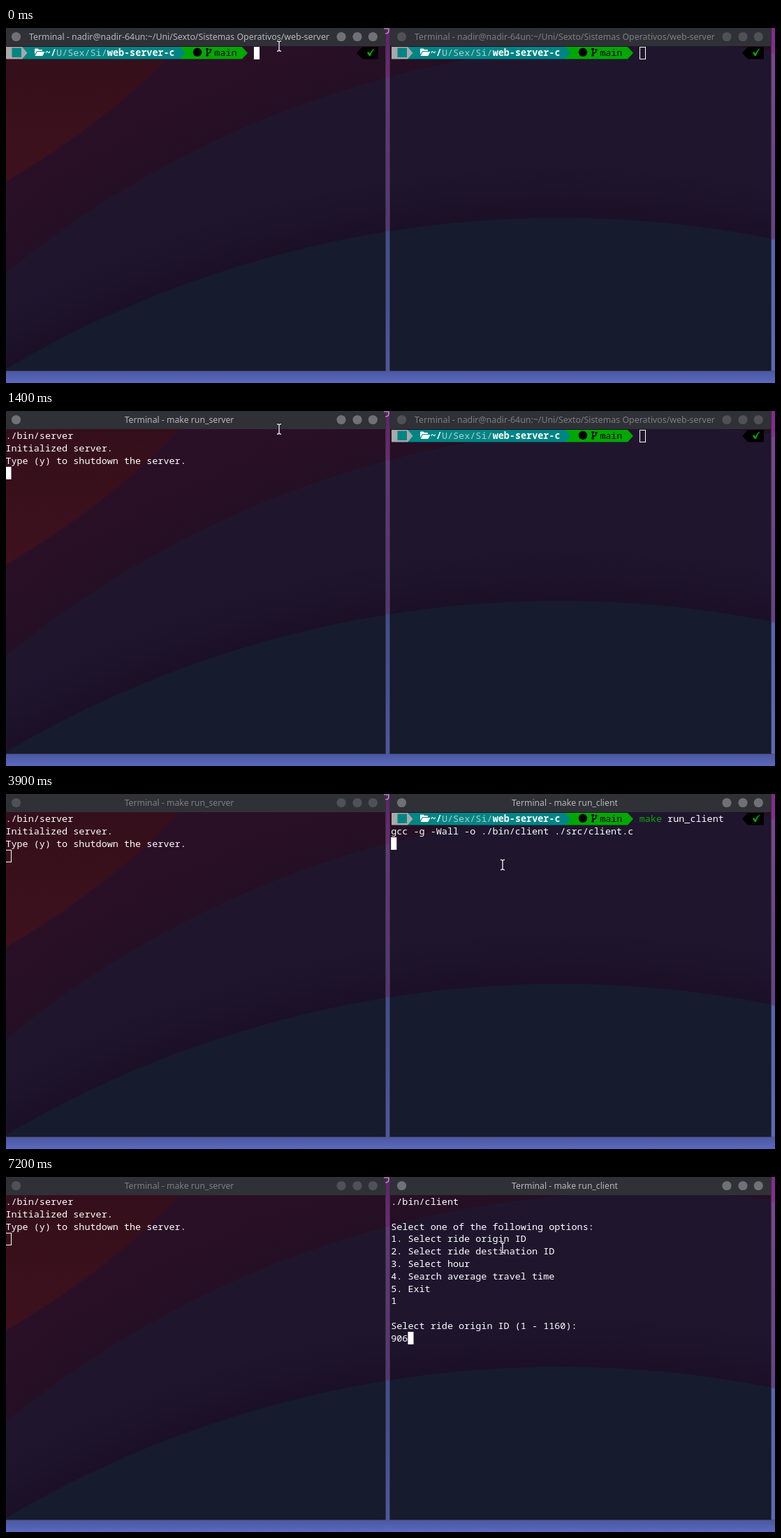
An HTML page for the animation above (8000 ms loop, 1101x509 px).

```html
<!DOCTYPE html>
<html lang="en">
<head>
<meta charset="utf-8">
<title>Two terminals</title>
<style>
html, body { margin: 0; width: 100%; height: 100%; overflow: hidden; background: #5a66bb; }
svg { display: block; width: 1101px; height: 509px; }
text { white-space: pre; }
.mono { font: 500 13.467px "Noto Sans Mono", "DejaVu Sans Mono", monospace; }
.bold { font-weight: 700; }
.bar { font-family: "Noto Sans", "Open Sans", sans-serif; text-anchor: middle; }
</style>
</head>
<body>
<svg viewBox="0 0 1101 509" xmlns="http://www.w3.org/2000/svg">
  <defs>
    <clipPath id="panes"><path d="M0 26H543V491H0ZM550 26H1095V491H550Z"/></clipPath>
    <radialGradient id="wine" gradientUnits="userSpaceOnUse" cx="920" cy="1472" r="1545">
      <stop offset=".9385" stop-color="#240f24"/><stop offset="1" stop-color="#2a1027"/>
    </radialGradient>
    <radialGradient id="plum" gradientUnits="userSpaceOnUse" cx="793" cy="1832" r="1640">
      <stop offset=".9512" stop-color="#1b1026"/><stop offset="1" stop-color="#1f162e"/>
    </radialGradient>
    <linearGradient id="red" x1="0" y1="0" x2="0" y2="1">
      <stop offset="0" stop-color="#340f1b"/><stop offset="1" stop-color="#3d111d"/>
    </linearGradient>
    <linearGradient id="gap" gradientUnits="userSpaceOnUse" x1="0" y1="0" x2="0" y2="509">
      <stop offset="0" stop-color="#5f2468"/><stop offset=".138" stop-color="#6b2a74"/>
      <stop offset=".142" stop-color="#643877"/><stop offset=".57" stop-color="#573575"/>
      <stop offset=".575" stop-color="#414d90"/><stop offset="1" stop-color="#4c58a4"/>
    </linearGradient>
    <linearGradient id="edge" gradientUnits="userSpaceOnUse" x1="0" y1="0" x2="0" y2="509">
      <stop offset="0" stop-color="#85298c"/><stop offset=".07" stop-color="#8a2d93"/>
      <stop offset=".075" stop-color="#7c4494"/><stop offset=".593" stop-color="#66408a"/>
      <stop offset=".598" stop-color="#5563b4"/><stop offset="1" stop-color="#5a68bc"/>
    </linearGradient>
    <linearGradient id="floor" x1="0" y1="0" x2="0" y2="1">
      <stop offset="0" stop-color="#4a56a0"/><stop offset="1" stop-color="#5b69be"/>
    </linearGradient>
  </defs>

  <rect width="1101" height="509" fill="#5a66bb"/>
  <rect x="543" width="8" height="509" fill="url(#gap)"/>
  <rect x="1095" width="6" height="509" fill="url(#edge)"/>
  <rect y="491" width="1101" height="18" fill="url(#floor)"/>

  <path d="M0 0H544V492H0ZM549 0H1096V492H549Z" fill="#33353c"/>
  <g clip-path="url(#panes)">
    <rect y="26" width="1101" height="465" fill="url(#wine)"/>
    <path d="M0 220Q148 133 249 26H0Z" fill="url(#red)"/>
    <circle cx="920" cy="1472" r="1450" fill="url(#plum)"/>
    <circle cx="793" cy="1832" r="1560" fill="#161b2d"/>
  </g>
  <path d="M0 0H544V26H0ZM549 0H1096V26H549Z" fill="#2f3137"/>
  <path d="M541 1H548V4Q548 8 543 8" fill="none" stroke="#d9a5dd" stroke-width="1.2"/>
  <g id="live"></g>
</svg>
<script>
const LOOP = 8000, CELL = 8.08, ROW = 17.8;
const LEFT = -0.6, RIGHT = 551.2;
const live = document.getElementById("live");
const HOME = "Terminal - nadir@nadir-64un:~/Uni/Sexto/Sistemas Operativos/web-server";
const SERVER = ["./bin/server", "Initialized server.", "Type (y) to shutdown the server."];
const MENU = ["./bin/client", "", "Select one of the following options:", "1. Select ride origin ID",
  "2. Select ride destination ID", "3. Select hour", "4. Search average travel time", "5. Exit"];
const ASK = ["1", "", "Select ride origin ID (1 - 1160):"];

const put = (x0, col, row, str, fill = "#fff", cls = "") =>
  `<text class="mono ${cls}" x="${x0 + col * CELL}" y="${Math.round(40 + row * ROW)}" fill="${fill}">${str}</text>`;

const lines = (x0, list) => list.map((s, i) => put(x0, 0, i, s)).join("");

function caret(x0, col, row, solid) {
  const x = x0 + col * CELL, y = Math.floor(27 + row * ROW);
  return solid
    ? `<rect x="${x}" y="${y}" width="${CELL}" height="18" fill="#fff"/>`
    : `<rect x="${Math.round(x) + .5}" y="${y + .5}" width="8" height="17" fill="none" stroke="#fff"/>`;
}

function titleBar(x, title, active) {
  const size = title === HOME ? 12.37 : 12.22;
  const dots = [14.5, 480, 503, 525.3].map(cx =>
    `<circle cx="${x + cx}" cy="12.5" r="6.6" fill="${active ? "#707176" : "#505157"}"/>`).join("");
  return dots + `<text class="bar" x="${x + 248}" y="17" font-size="${size}" fill="${
    active ? "#b6b7b9" : "#7d7e82"}">${title}</text>`;
}

function prompt(x0) {
  const shapes = `<g transform="translate(${Math.round(x0 + .6)} 0)">
    <path d="M249 27H338L346 35.8L338 44.6H249Z" fill="#00a800"/>
    <path d="M22 27H249L256.5 35.8L249 44.6H22Z" fill="#008585"/>
    <path d="M0 27H23L30.5 35.8L23 44.6H0Z" fill="#a9a9a9"/>
    <rect x="8.5" y="28.5" width="13.5" height="13.5" fill="#008585"/>
    <path d="M41 38V30.5Q41 29.5 42 29.5H45.5L47 31H51Q52 31 52 32V33H45Q44 33 43.5 34ZM41.5 40L44.3 34.6Q44.6 34 45.3 34H55.5L52.8 39.3Q52.4 40 51.7 40Z" fill="#fff"/>
    <circle cx="274" cy="34.8" r="6.2"/>
    <path d="M288 31V38M288 36.5Q293 36 293 32.5" fill="none" stroke="#000" stroke-width="1.5"/>
    <path d="M286.3 29h3.4v2.6h-3.4zM286.3 38h3.4v2.6h-3.4zM291.3 30h3.2v2.6h-3.2z"/>
    <path d="M502 35.8L510 27H533V44.6H510Z"/>
    <path d="M517 35.5L519 34L521 37Q523 32 526.5 29.5L527 30.2Q523.5 34.5 521.8 40H520Z" fill="#00b000"/>
  </g>`;
  return shapes + put(x0, 7, 0, "~/", "#fff", "bold") + put(x0, 9, 0, "U/Sex/Si/", "#b5cccc")
    + put(x0, 18, 0, "web-server-c", "#fff", "bold") + put(x0, 37, 0, "main", "#000");
}

const command = (x0, target) => put(x0, 44, 0, "make", "#0aa80a") + put(x0, 49, 0, target);

function leftPane(t) {
  const active = t < 2200;
  const bar = titleBar(0, t < 1200 ? HOME : "Terminal - make run_server", active);
  if (t < 200) return bar + prompt(LEFT) + caret(LEFT, 44, 0, true);
  if (t < 900) {
    // one typed letter with the shell's suggestion after it
    return bar + prompt(LEFT) + put(LEFT, 44, 0, "m", "#d02020", "bold") + caret(LEFT, 45, 0, true)
      + put(LEFT, 45, 0, "a", "#1e1228") + put(LEFT, 46, 0, "ke run_server", "#686868");
  }
  if (t < 1300) {
    return bar + prompt(LEFT) + command(LEFT, "run_server")
      + (t < 1200 ? caret(LEFT, 59, 0, true) : caret(LEFT, 0, 1, true));
  }
  const shown = SERVER.slice(0, t < 1400 ? 1 : 3);
  return bar + lines(LEFT, shown) + caret(LEFT, 0, shown.length, active);
}

function rightPane(t) {
  const active = t >= 2200;
  const bar = titleBar(552, t < 3900 ? HOME : "Terminal - make run_client", active);
  if (t < 3600) return bar + prompt(RIGHT) + caret(RIGHT, 44, 0, active);
  if (t < 4400) {
    const typed = bar + prompt(RIGHT) + command(RIGHT, "run_client");
    return t < 3900 ? typed + caret(RIGHT, 59, 0, true)
      : typed + put(RIGHT, 0, 1, "gcc -g -Wall -o ./bin/client ./src/client.c") + caret(RIGHT, 0, 2, true);
  }
  if (t < 5400) {
    const typed = t < 5000 ? "" : "1";
    return bar + lines(RIGHT, [...MENU, typed]) + caret(RIGHT, typed.length, 8, true);
  }
  const id = "906".slice(0, [6600, 6800, 7200].filter(at => t >= at).length);
  return bar + lines(RIGHT, [...MENU, ...ASK, id]) + caret(RIGHT, id.length, 11, true);
}

function pointer(t) {
  const step = Math.max(0, Math.min(3, Math.floor((t - 1700) / 100)));
  const x = 391 + 320 * step / 3, y = 26 + 75.5 * step / 3;
  const beam = "M-3-7.3Q0-7.3 0-5.3Q0-7.3 3-7.3M0-5.5V5.5M-3 7.3Q0 7.3 0 5.3Q0 7.3 3 7.3";
  return `<g transform="translate(${x} ${y})" fill="none"><path d="${beam}" stroke="#15121c" stroke-width="3"/>
    <path d="${beam}" stroke="#e6e6e6" stroke-width="1.4"/></g>`;
}

let last = "";
function draw(now) {
  const t = now % LOOP;
  const scene = leftPane(t) + rightPane(t) + pointer(t);
  if (scene !== last) live.innerHTML = last = scene;
  requestAnimationFrame(draw);
}
draw(0);
</script>
</body>
</html>
```
